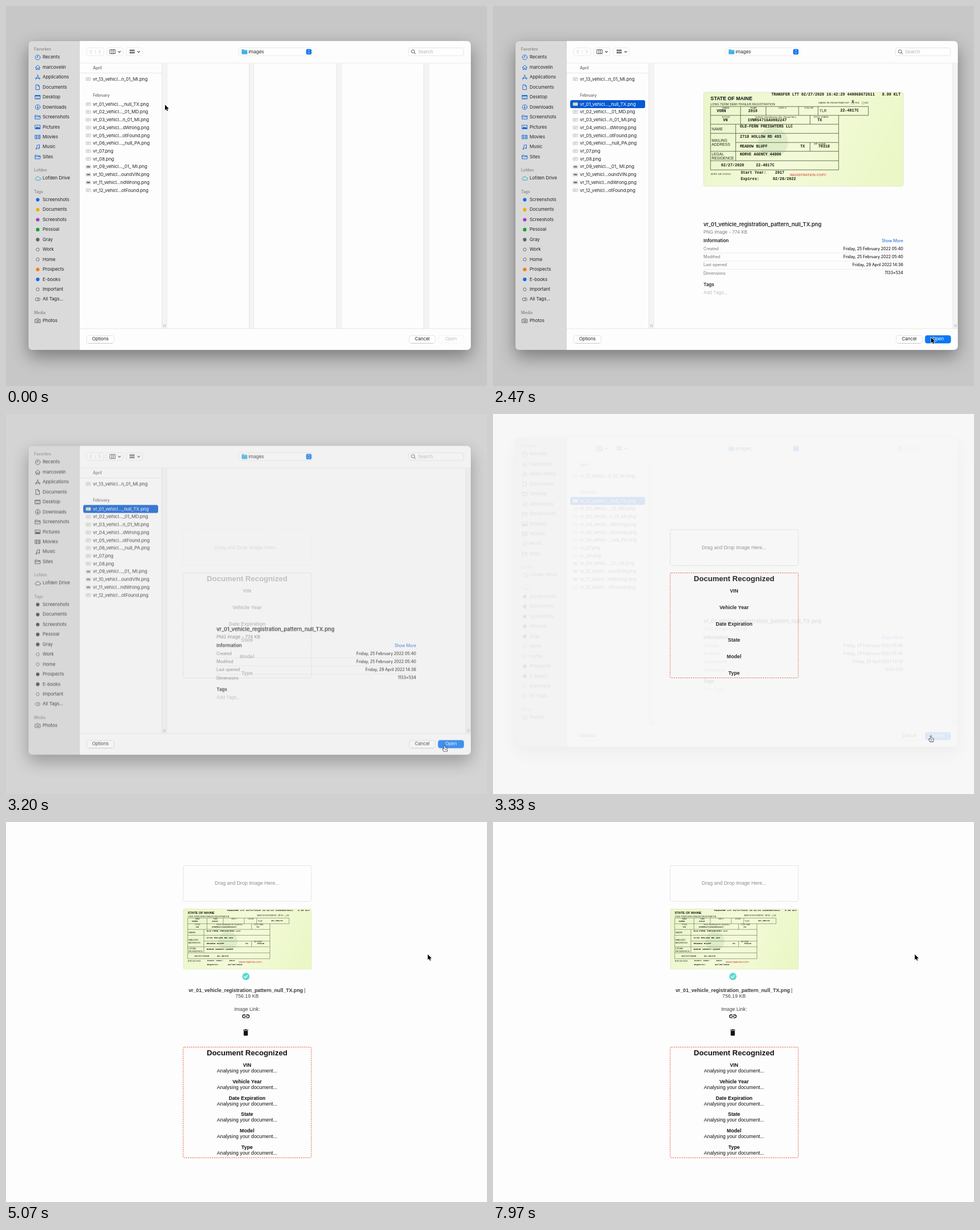
These frames come from a looping animation (841 by 666 pixels, 8 s). An HTML page with a canvas:

```html
<!DOCTYPE html>
<html lang="en">
<head>
<meta charset="utf-8">
<title>Document upload</title>
<style>
html, body { margin: 0; width: 100%; height: 100%; overflow: hidden; background: #fdfdfd; }
canvas { display: block; width: 841px; height: 666px; }
</style>
</head>
<body>
<canvas id="stage"></canvas>
<script>
const W = 841, H = 666, LOOP = 8000;
const SELECT = 780, CLOSE = 3052, CLOSE_MS = 295, UPLOADED = 3650;
const UI = 'Inter, sans-serif';
const SANS = '"Liberation Sans", Arial, sans-serif';
const MONO = '"Liberation Mono", monospace';
const BLUE = '#0a68d8', INK = '#262626';
const ratio = window.devicePixelRatio || 1;

function makeLayer(canvas) {
  canvas.width = W * ratio;
  canvas.height = H * ratio;
  const c = canvas.getContext('2d');
  c.scale(ratio, ratio);
  return c;
}
const stage = makeLayer(document.getElementById('stage'));
let g = stage;

// Drawing helpers
function text(s, x, y, size, { color = INK, weight = 400, align = 'left', font = UI } = {}) {
  g.font = `${weight} ${size}px ${font}`;
  g.letterSpacing = font === UI ? '-0.1px' : '0px';
  g.textAlign = align;
  g.textBaseline = 'middle';
  g.fillStyle = color;
  g.fillText(s, x, y);
}
function rect(x, y, w, h, color) {
  g.fillStyle = color;
  g.fillRect(x, y, w, h);
}
function box(x, y, w, h, r, fill, stroke, width = 0.6) {
  g.beginPath();
  g.roundRect(x, y, w, h, r);
  if (fill) { g.fillStyle = fill; g.fill(); }
  if (stroke) { g.strokeStyle = stroke; g.lineWidth = width; g.stroke(); }
}
function dot(x, y, r, fill, stroke, width = 0.8) {
  box(x - r, y - r, 2 * r, 2 * r, r, fill, stroke, width);
}
function shape(d, x, y, { fill, stroke, width = 0.9, scale = 1 } = {}) {
  const p = new Path2D(d);
  g.save();
  g.translate(x, y);
  g.scale(scale, scale);
  g.lineJoin = g.lineCap = 'round';
  if (stroke) { g.strokeStyle = stroke; g.lineWidth = width; g.stroke(p); }
  if (fill) { g.fillStyle = fill; g.fill(p); }
  g.restore();
}
function dashed(x, y, w, h, color) {
  g.setLineDash([2.4, 1.4]);
  box(x, y, w, h, 2, null, color, 0.9);
  g.setLineDash([]);
}

// Vehicle registration card, 349 x 164.5
function card(x, y, scale) {
  g.save();
  g.translate(x, y);
  g.scale(scale, scale);
  const bg = g.createLinearGradient(0, 0, 349, 164);
  bg.addColorStop(0, '#eaf6ca');
  bg.addColorStop(0.5, '#f3fad9');
  bg.addColorStop(1, '#eaf7c3');
  box(0, 0, 349, 164.5, 3, bg, 'rgba(150,170,110,.45)', 0.5);
  dot(121.5, 88, 26, 'rgba(165,195,155,.25)');

  const line = (x1, y1, x2, y2) => {
    g.moveTo(x1, y1);
    g.lineTo(x2, y2);
  };
  g.beginPath();
  line(12, 25, 288, 25);
  line(12, 40.5, 288, 40.5);
  line(288, 25, 288, 40.5);
  for (const cx of [64.5, 109, 166, 200]) line(cx, 25, cx, 40.5);
  for (const cx of [64.5, 186]) line(cx, 40.5, cx, 56);
  for (const cy of [56, 72, 103.5, 120, 136]) line(12, cy, 236, cy);
  line(56, 88, 236, 88);
  line(56, 56, 56, 120);
  line(186, 88, 186, 103.5);
  line(12, 25, 12, 136);
  line(236, 40.5, 236, 136);
  g.strokeStyle = '#4b5140';
  g.lineWidth = 0.8;
  g.stroke();

  const print = (s, px, py) => text(s, px, py, 6.7, { font: MONO, weight: 700, color: '#15180f' });
  const label = (s, px, py, size = 4.4, opt = {}) =>
    text(s, px, py, size, { font: SANS, color: '#2a2e22', ...opt });
  const mid = (s, px, py) => label(s, px, py, 4.4, { align: 'center' });

  print('TRANSFER LTT 02/27/2020 16:42:29 440068672611', 118.5, 4);
  print('8.00 KLT', 312, 4);
  label('STATE OF MAINE', 12, 11.7, 8.8, { weight: 700, color: '#111' });
  label('LONG TERM SEMI-TRAILER REGISTRATION', 12, 21, 5.4);
  label('MAINE RE REGISTRATION?', 201, 19, 4.1);
  label('YES', 264, 19, 4.1);
  label('NO', 282, 19, 4.1);
  for (const bx of [259, 277]) box(bx, 17, 3.5, 3.5, 0, null, '#555', 0.4);
  print('X', 259, 17);
  mid('MAKE', 39, 28);
  mid('YEAR', 87, 28);
  mid('UNIT #', 138, 28);
  mid('COLOR', 184, 28);
  mid('STYLE', 39, 44);
  mid('Vehicle Identification No. (Serial No.)', 126, 44);
  mid('TITLE STATE', 205, 44);
  mid('ZIP CODE', 203, 91);
  label('TLR', 202.5, 33, 6.7);
  label('NAME', 14, 65, 6.7);
  label('MAILING', 14, 85, 6.7);
  label('ADDRESS', 14, 92, 6.7);
  label('LEGAL', 14, 109, 6.7);
  label('RESIDENCE', 14, 116.3, 6.7);
  print('VORN', 23, 33);
  print('2010', 78, 33);
  print('22-4817C', 239, 32.5);
  print('VN', 34, 49);
  print('1VNRS4716AU082247', 77, 49);
  print('TX', 199, 49);
  print('OLD-FERN FREIGHTERS LLC', 63.5, 60.5);
  print('2718 HOLLOW RD 493', 63.5, 78.5);
  print('MEADOW BLUFF', 63.5, 95);
  print('TX', 169, 95);
  print('70318', 200.5, 95);
  print('NORVE AGENCY 44006', 63.5, 109.5);
  print('02/27/2020', 30.5, 128);
  print('22-4817C', 91.5, 128);
  print('Start Year:', 65, 141.3);
  print('2017', 125, 141.3);
  print('Expires:', 65, 152);
  print('02/28/2022', 121, 152);
  label('MVRT-10E 07/2015', 12.5, 144, 4);
  label('REGISTRATION COPY', 151, 145.5, 6, { color: '#d3231c' });
  g.restore();
}

// Icons in a 10 x 10 box
const RING = 'M9.2 5A4.2 4.2 0 1 1 .8 5A4.2 4.2 0 1 1 9.2 5Z';
const FOLDER = 'M.7 2H4L5 3H9.3V8.4H.7ZM.7 4.4H9.3';
const ICONS = {
  Recents: RING + 'M5 2.4V5H3.2',
  marcovelin: 'M.8 5.2L5 1.3 9.2 5.2M2 4.5V9H4V6.3H6V9H8V4.5',
  Applications: 'M5.4 1L1.6 9M4.6 1L8.4 9M.6 6.6H9.4',
  Documents: 'M2 .8H5.8L8 3V9.2H2ZM5.6 1V3.2H8',
  Desktop: 'M.7 1.8H9.3V8.2H.7ZM.7 3H9.3M2.5 7H7.5',
  Downloads: RING + 'M5 2.6V7.2M3.2 5.5L5 7.3 6.8 5.5',
  Screenshots: FOLDER,
  Pictures: 'M.7 1.8H9.3V8.2H.7ZM1 7.6L3.6 4.6 5.4 6.6 7 5.2 9 7.4',
  Movies: 'M.7 2H9.3V8H.7ZM2.7 2V8M7.3 2V8M2.7 5H7.3',
  Music: 'M3.6 7.8V2.2L8 1.2V6.8M3.6 7.8A1 .9 0 1 1 3.5 7.6M8 6.8A1 .9 0 1 1 7.9 6.6',
  Sites: FOLDER
};
const CLOUD = 'M2.4 8.2A2.1 2.1 0 0 1 2 4.2A2.9 2.9 0 0 1 7.5 3.8A2.2 2.2 0 0 1 8.2 8.2Z';
const CAMERA = 'M.6 2.8H2.8L3.6 1.5H6.4L7.2 2.8H9.4V8.5H.6ZM6.7 5.5A1.7 1.7 0 1 1 3.3 5.5A1.7 1.7 0 1 1 6.7 5.5Z';
const TAGS = [
  ['Screenshots', '#0a6fe8'], ['Documents', '#efac08'], ['Screeshots', '#a23ac4'],
  ['Pessoal', '#12a22b'], ['Gray', '#636366'], ['Work'], ['Home'],
  ['Prospects', '#f47a0c'], ['E-books', '#0a6fe8'], ['Important']
];
const FILES = [
  'vr_01_vehicl..._null_TX.png', 'vr_02_vehicl..._01_MD.png', 'vr_03_vehicl...n_01_MI.png',
  'vr_04_vehicl...dWrong.png', 'vr_05_vehicl...otFound.png', 'vr_06_vehicl..._null_PA.png',
  'vr_07.png', 'vr_08.png', 'vr_09_vehicl..._01_ MI.png', 'vr_10_vehicl...oundVIN.png',
  'vr_11_vehicl...ndWrong.png', 'vr_12_vehicl...otFound.png'
];

function sidebar(inactive) {
  const tint = inactive ? '#3c3c3e' : BLUE;
  const head = (s, y) => text(s, 49, y, 6.9, { weight: 600, color: '#8d8d8f' });
  const item = (s, y) => text(s, 64, y, 8.1);
  const icon = (d, y, color = tint) => shape(d, 50.5, y - 5, { stroke: color });

  head('Favorites', 76);
  Object.keys(ICONS).forEach((name, i) => {
    const y = 90 + i * 17.45;
    icon(ICONS[name], y);
    item(name, y);
  });
  if (!inactive) shape('M.7 1.8H9.3V3.2H.7Z', 50.5, 155, { fill: tint });
  shape('M1 8L3.6 4.6 5.4 6.6 7 5.2 9 8Z', 50.5, 207, { fill: tint });
  head('Lofden', 288.3);
  icon(CLOUD, 302, inactive ? tint : '#14a8bd');
  item('Lofden Drive', 302);
  head('Tags', 325.6);
  TAGS.forEach(([name, color], i) => {
    const y = 339.6 + i * 17.45;
    if (color) dot(55.5, y, 3.1, inactive ? '#3c3c3e' : color);
    else dot(55.5, y, 2.7, null, '#555');
    item(name, y);
  });
  dot(56.8, 514, 2.6, null, '#555');
  dot(54, 514, 2.6, '#dadada', '#555');
  item('All Tags...', 514);
  head('Media', 537.8);
  icon(CAMERA, 551.5, '#55555a');
  item('Photos', 551.5);
}

function button(label, x, w, kind) {
  const look = {
    plain: ['#fff', '#d2d2d2', INK],
    off: ['#fdfdfd', '#ececec', '#c0c0c0'],
    primary: ['#0a79f8', '#0867d8', '#fff']
  }[kind];
  box(x, 577.5, w, 13.4, 3.4, look[0], look[1]);
  if (kind === 'plain') rect(x + 3, 591, w - 6, 0.6, '#bdbdbd');
  text(label, x + w / 2, 584, 8.1, { color: look[2], align: 'center' });
}

function toolbar() {
  const chevron = (x) => shape('M0 0L2 2 4 0', x, 79.4, { stroke: '#444', width: 1.1 });
  const frame = (x, w) => box(x, 73.3, w, 13.6, 3.4, '#fefefe', '#dcdcdc');
  frame(141, 30);
  shape('M3 0L0 3 3 6', 146.8, 77, { stroke: '#bdbdbd' });
  shape('M0 0L3 3 0 6', 162.4, 77, { stroke: '#bdbdbd' });
  rect(156, 77, 0.6, 7, '#d0d0d0');
  frame(176, 29);
  shape('M0 0H9V7H0ZM3 0V7M6 0V7', 182, 76.6, { stroke: '#444' });
  chevron(196.3);
  frame(210, 29);
  for (let i = 0; i < 6; i++) {
    box(216.5 + (i % 3) * 3, 76.6 + (i > 2 ? 4 : 0), 2, 2.4, 0.4, '#555', '#444', 0.4);
  }
  chevron(230);
  frame(406.5, 129.5);
  shape('M0 1Q0 0 1 0H3.6L4.6 1H9Q10 1 10 2V7.4Q10 8.4 9 8.4H1Q0 8.4 0 7.4Z', 412, 76, { fill: '#43b0e4' });
  rect(412, 78.2, 10, 0.7, '#7fcdf1');
  text('images', 424, 80.2, 8.1);
  box(524.8, 75.5, 9.4, 9.4, 2.2, '#0a72f0');
  shape('M0 2L1.7 .3 3.4 2M0 4.4L1.7 6.1 3.4 4.4', 527.8, 77, { stroke: '#fff' });
  box(703.5, 73.5, 96.5, 13.4, 3.2, '#fefefe', '#d5d5d5');
  dot(711.6, 79.6, 2.9, null, '#444', 0.9);
  shape('M0 0L2.2 2.2', 713.8, 81.8, { stroke: '#444', width: 1 });
  text('Search', 720.5, 80.3, 8.1, { color: '#b5b5b8' });
}

function fileRow(name, y, selected, i = 0) {
  if (selected) box(135, y - 6.9, 131, 13.8, 3, '#0459d4');
  const dark = i > 7 && i < 11;
  box(139.8, y - 2.7, 8.4, 5.4, 0.8, selected ? '#dfe8c8' : '#f1f1ec', '#a9a9a9', 0.5);
  rect(141.2, y - 1.2, 5.6, dark ? 2.6 : 0.7, dark ? '#66666e' : '#b2b2ac');
  rect(141.2, y + 0.8, 4, 0.6, '#b8b8b4');
  text(name, 152, y + 0.3, 8.1, { color: selected ? '#fff' : INK });
}

function divider(x) {
  rect(x, 100, 9, 465, '#f4f4f5');
  rect(x, 100, 0.7, 465, '#dedee0');
  rect(x + 8.6, 100, 0.6, 465, '#e6e6e8');
}
function grip(x) {
  for (const dx of [-1.5, 1]) rect(x + dx, 557.8, 0.8, 5, '#a8a8aa');
}

function preview(withCard) {
  if (withCard) card(368.3, 151.2, 1);
  text('vr_01_vehicle_registration_pattern_null_TX.png', 368, 383.6, 9.3, { weight: 600 });
  text('PNG image - 774 KB', 368, 396.4, 8.1, { color: '#808083' });
  text('Information', 368, 411.6, 8.1, { weight: 600 });
  text('Show More', 717, 411.6, 7.2, { color: BLUE, align: 'right' });
  const info = [
    ['Created', 'Friday, 25 February 2022 05:40'],
    ['Modified', 'Friday, 25 February 2022 05:40'],
    ['Last opened', 'Friday, 29 April 2022 14:36'],
    ['Dimensions', '1133×534']
  ];
  info.forEach(([key, value], i) => {
    const y = 425.6 + i * 14.25;
    text(key, 368, y, 7.2, { color: '#77777a' });
    text(value, 717, y, 7.1, { weight: 500, align: 'right' });
    if (i < 3) rect(368, y + 6.9, 349, 0.6, '#e1e1e3');
  });
  text('Tags', 368, 488.2, 8.1, { weight: 600 });
  text('Add Tags...', 368, 502.4, 8.1, { color: '#bfbfc2' });
}

function dialog(selected, closing) {
  g = makeLayer(document.createElement('canvas'));
  const x = 39, y = 61, w = 774, h = 542;
  g.shadowColor = 'rgba(0,0,0,.38)';
  g.shadowBlur = 30 * ratio;
  g.shadowOffsetY = 12 * ratio;
  box(x, y, w, h, 7, '#fdfdfd');
  g.shadowColor = 'transparent';
  g.save();
  g.beginPath();
  g.roundRect(x, y, w, h, 7);
  g.clip();
  rect(x, y, 89.5, h, '#dadadb');
  rect(128.2, y, 0.6, h, '#cdcdce');
  rect(128.8, 99.7, 685, 0.7, '#e0e0da');
  rect(128.8, 565, 685, 0.7, '#e0e0da');
  sidebar(closing);
  toolbar();

  const head = (s, hy) => text(s, 152, hy, 6.9, { weight: 600, color: '#77777a' });
  head('April', 109.4);
  rect(129, 117.3, 143, 0.7, '#dedede');
  fileRow('vr_13_vehicl...n_01_MI.png', 128, false);
  head('February', 157.3);
  FILES.forEach((name, i) => fileRow(name, 172 + i * 13.72, selected && i === 0, i));

  divider(272.3);
  grip(277);
  if (selected) {
    divider(803.8);
    grip(808.5);
    preview(!closing);
  } else {
    [424.8, 577.6, 730.2].forEach(divider);
  }
  button('Options', 141, 48, 'plain');
  button('Cancel', 705, 45.5, 'plain');
  button('Open', 755.7, 44.6, selected ? 'primary' : 'off');
  g.restore();
  box(x, y, w, h, 7, null, 'rgba(0,0,0,.22)', 0.6);
  const layer = g.canvas;
  g = stage;
  return layer;
}

// Web page behind the dialog
const MID = 421.5;
function pageText(s, y, opt = {}, size = 8.75) {
  text(s, MID, y, size, { font: SANS, align: 'center', color: '#111', ...opt });
}

function fileInfo() {
  card(310, 152.3, 0.642);
  dot(419.5, 270.7, 6.4, '#5fd9cf');
  shape('M0 2.4L2 4.4 6 0', 416.5, 268.6, { stroke: '#fff', width: 1.2 });
  g.font = `700 8.75px ${SANS}`;
  g.letterSpacing = '0px';
  const name = 'vr_01_vehicle_registration_pattern_null_TX.png';
  const nameW = g.measureText(name).width;
  g.font = `400 8.75px ${SANS}`;
  const left = MID - (nameW + g.measureText(' |').width) / 2;
  text(name, left, 296, 8.75, { font: SANS, weight: 700, color: '#3a3a3a' });
  text(' |', left + nameW, 296, 8.75, { font: SANS, color: '#3a3a3a' });
  pageText('756.19 KB', 306, { color: '#444' });
  pageText('Image Link:', 328.3, { color: '#444' });
  shape('M5.2 .6H3.2A2.6 2.6 0 0 0 3.2 5.8H5.2M7.6 .6H9.6A2.6 2.6 0 0 1 9.6 5.8H7.6M4.2 3.2H8.6',
    413, 337.4, { stroke: '#111', width: 1.3 });
  shape('M0 .7H2.4L3 0H5.6L6.2 .7H8.6V2.1H0ZM.7 2.9H7.9V10Q7.9 11.2 6.7 11.2H1.9Q.7 11.2 .7 10Z',
    414.9, 363.2, { fill: '#111' });
}

function page(uploaded) {
  rect(0, 0, W, H, '#fdfdfd');
  const drop = uploaded ? 76.5 : 202.8;
  const top = uploaded ? 394.5 : 278.5;
  dashed(309.8, drop, 224, 62.7, '#d3d3dc');
  pageText('Drag and Drop Image Here...', drop + 31.5, { color: '#8c8c8c' });
  if (uploaded) fileInfo();
  dashed(309.8, top, 224, uploaded ? 194 : 184, '#e25a3c');
  pageText('Document Recognized', top + 11, { weight: 700 }, 13.1);
  ['VIN', 'Vehicle Year', 'Date Expiration', 'State', 'Model', 'Type'].forEach((s, i) => {
    const y = top + 32.3 + i * 28.7;
    pageText(s, y, { weight: 700 });
    if (uploaded) pageText('Analysing your document...', y + 10);
  });
}

// Pointer: time, x, y
const MOVES = [
  [100, 278, 173], [700, 234, 168], [1250, 234, 168],
  [2300, 766, 581], [3220, 766, 581], [4050, 737.5, 232]
];
function pointerAt(t) {
  const next = MOVES.findIndex((m) => m[0] > t);
  if (next === 0) return MOVES[0].slice(1);
  if (next < 0) return MOVES[MOVES.length - 1].slice(1);
  const [t0, x0, y0] = MOVES[next - 1], [t1, x1, y1] = MOVES[next];
  const p = (t - t0) / (t1 - t0), e = p * p * (3 - 2 * p);
  return [x0 + (x1 - x0) * e, y0 + (y1 - y0) * e];
}
const ARROW = 'M0 0V9.6L2.2 7.6 3.7 11 5.2 10.3 3.8 7.1H6.8Z';
const HAND = 'M-.8 .8Q0 -.4 .8 .8V4L3.6 4.6Q4.8 5 4.6 6.2L3.9 10.4H-1.2L-3.6 6.6Q-3.2 5.2 -1.8 6L-.8 6.8Z';
function pointer(t) {
  const [x, y] = pointerAt(t);
  const hand = t >= CLOSE && t < 3480;
  if (hand) {
    shape(HAND, x + 1, y, { fill: '#fff', stroke: '#111', width: 1.2 });
    shape('M.9 6V8.2M2.4 6.2V8.2', x + 1, y, { stroke: '#333', width: 0.6 });
  } else {
    shape(ARROW, x, y, { fill: '#000', stroke: '#fff', width: 1.4 });
  }
}

const idle = dialog(false, false);
const chosen = dialog(true, false);
const leaving = dialog(true, true);

function draw(t) {
  page(t >= UPLOADED);
  const p = Math.min(1, Math.max(0, (t - CLOSE) / CLOSE_MS));
  const gone = p * p;
  if (gone < 1) {
    rect(0, 0, W, H, `rgba(0,0,0,${0.215 * (1 - gone)})`);
    g.globalAlpha = 1 - gone;
    const layer = t < SELECT ? idle : t < CLOSE ? chosen : leaving;
    g.drawImage(layer, 0, -22 * gone, W, H);
    g.globalAlpha = 1;
  }
  pointer(t);
}

const start = performance.now();
function tick() {
  draw((performance.now() - start) % LOOP);
  requestAnimationFrame(tick);
}
tick();
</script>
</body>
</html>
```
